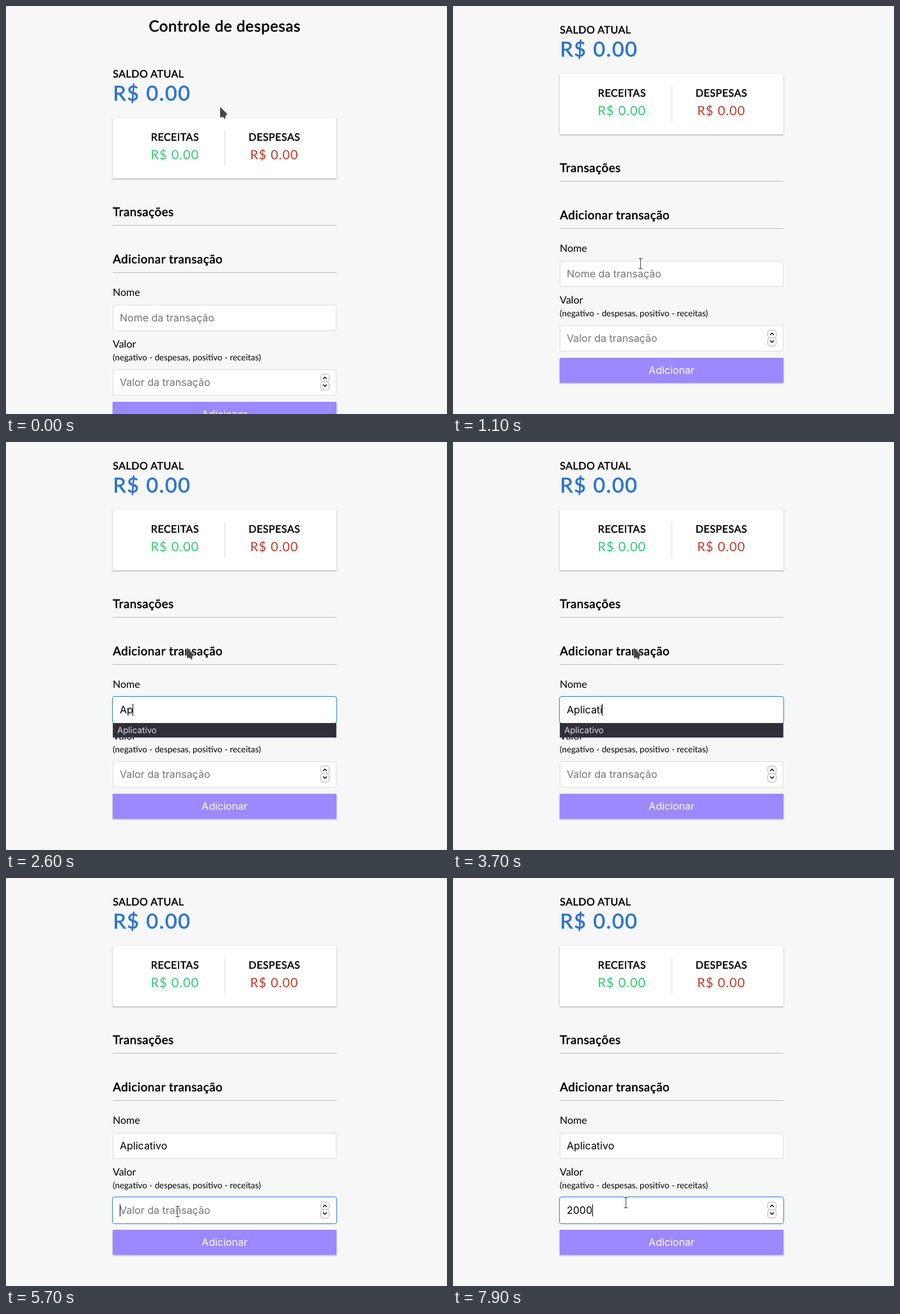
An HTML page that plays this animation: 690x639 px, repeating every 8000 ms.

```html
<!DOCTYPE html>
<html lang="pt-BR">
<head>
<meta charset="utf-8">
<title>Controle de despesas</title>
<style>
  html, body { margin: 0; width: 100%; height: 100%; overflow: hidden; background: #f7f7f7; }
  #stage { position: relative; width: 690px; height: 639px; overflow: hidden; }
  #page, .box, svg { position: absolute; left: 0; top: 0; }
  svg { width: 690px; height: 639px; overflow: visible; }
  .box { left: 167px; width: 350px; box-shadow: 0 1px 3px rgba(0,0,0,.12), 0 1px 2px rgba(0,0,0,.24); }
  .card { top: 106px; height: 95px; background: #fff; }
  .btn { top: 551px; height: 39px; background: #9c88ff; }
  text { font: 16px Lato, sans-serif; fill: #000; white-space: pre; text-rendering: geometricPrecision; }
  .mid { text-anchor: middle; }
  /* thin outline plus tracking thickens the regular weight */
  .h1, .h2, .h3, .h4 { stroke: #000; stroke-width: .5px; letter-spacing: .5px; }
  .h1 { font-size: 32px; fill: #2d74cb; stroke: #2d74cb; stroke-width: .75px; letter-spacing: 1.75px; }
  .h2 { font-size: 24px; stroke-width: .625px; letter-spacing: .625px; }
  .h3 { font-size: 18.72px; stroke-width: .54px; letter-spacing: .54px; }
  .money { font-size: 20px; letter-spacing: 1px; }
  .small { font-size: 13.333px; }
  .ui { font-family: Inter, sans-serif; }
  .hint { fill: #757575; }
  .item { font-size: 13.333px; fill: #dcdce2; }
  .field { fill: #fff; stroke: #dedede; }
  .field.on { stroke: #2f7fd3; }
  .spin { fill: #fff; stroke: #b5b5ba; }
  .chev { fill: none; stroke: #111; stroke-width: 1.5; }
</style>
</head>
<body>
<div id="stage">
  <div id="page">
    <div class="box card"></div>
    <div class="box btn"></div>
    <svg>
      <text class="h2 mid" x="342.3" y="-29">Controle de despesas</text>
      <text class="h4" x="167.2" y="43">SALDO ATUAL</text>
      <text class="h1" x="167.4" y="79">R$ 0.00</text>
      <text class="h4 mid" x="264.5" y="142">RECEITAS</text>
      <text class="h4 mid" x="420" y="142">DESPESAS</text>
      <text class="money mid" x="264.3" y="171" style="fill:#2ecc71">R$ 0.00</text>
      <text class="money mid" x="419.8" y="171" style="fill:#c0392b">R$ 0.00</text>
      <path d="M342.5 126V181" stroke="#dedede"/>
      <text class="h3" x="167.2" y="260">Transações</text>
      <text class="h3" x="167.2" y="334">Adicionar transação</text>
      <path d="M167 274.5H517M167 348.5H517" stroke="#bbb"/>
      <text x="167" y="385">Nome</text>
      <text x="167" y="466">Valor</text>
      <text class="small" x="167" y="486">(negativo - despesas, positivo - receitas)</text>
      <rect class="field" id="box0"/>
      <rect class="field" id="box1"/>
      <text class="ui" id="text0" x="178" y="425"></text>
      <text class="ui" id="text1" x="178" y="526"></text>
      <rect class="spin" x="492.5" y="507.5" width="13" height="12" rx="3.5"/>
      <rect class="spin" x="492.5" y="519.5" width="13" height="13" rx="3.5"/>
      <path class="chev" d="M496 515.2l3-3 3 3M496 523.8l3 3 3-3"/>
      <rect id="caret" width="1" height="19"/>
      <text class="ui mid" x="342" y="576" style="fill:#fff">Adicionar</text>
      <g id="list">
        <rect id="panel" x="167.5" y="440.5" width="349" fill="#2f2f37" stroke="#4c4c55"/>
        <g id="items"></g>
      </g>
    </svg>
  </div>
  <svg>
    <g id="arrow">
      <path d="M0 1.5V17.5L4 17 8 20.5 8.8 14.5 12 13Z" fill="#000" opacity=".15"/>
      <path d="M0 0V16.2L4 15.4 8 19 8.7 13.2 11.6 11.6Z" fill="#474747" stroke="#fff" stroke-width="1" paint-order="stroke"/>
    </g>
    <g id="beam" fill="none">
      <path d="M-2.5 -8H3.5M-2.5 8H3.5M.5 -8V8" stroke="#fff" stroke-width="3" opacity=".8"/>
      <path d="M-2.5 -8H3.5M-2.5 8H3.5M.5 -8V8" stroke="#444"/>
    </g>
  </svg>
</div>
<script>
const LOOP = 8000;
const $ = id => document.getElementById(id);

// each track is a list of [start ms, value...]
const scroll = [[0, 69], [100, 54], [200, 30], [300, 13], [400, 6], [500, 3], [600, 2], [700, 1], [800, .5], [900, 0]];
const pointer = [
  [0, 'arrow', 335, 158], [300, 'arrow', 334, 159], [500, 'arrow', 330, 185],
  [600, 'arrow', 321, 250], [700, 'arrow', 308, 330], [800, 'beam', 297, 395],
  [900, 'beam', 293, 424], [1000, 'beam', 293, 411], [1100, 'beam', 293, 403],
  [1200, 'beam', 293, 405], [1400, 'arrow', 286, 375], [1500, 'arrow', 283, 335],
  [1600, 'arrow', 282, 314], [2300, 'arrow', 283, 322], [5100, 'arrow', 281, 350],
  [5200, 'beam', 274, 425], [5300, 'arrow', 271, 485], [5400, 'beam', 270, 534],
  [5700, 'beam', 268, 522], [7900, 'beam', 270, 508]
];
const focus = [[0, -1], [1200, 0], [5700, 1]];
const caretOn = [[0, 1], [4900, 0], [5700, 1]];
const rows = [[0, 0], [2400, 4], [2600, 1], [5700, 0]];

// a typing track adds one letter at each time
const typed = (word, times) => [[0, ''], ...times.map((ms, i) => [ms, word.slice(0, i + 1)])];
const fields = [
  { y: 399, hint: 'Nome da transação',
    value: typed('Aplicativo', [2300, 2600, 2800, 3000, 3100, 3200, 3400, 3700, 4000, 4200]) },
  { y: 500, hint: 'Valor da transação',
    value: typed('2000', [6600, 6800, 7000, 7300]) }
];
const options = ['Aplicativo', 'Academia', 'Aluguel', 'Almoço'];

const at = (track, t) => track.findLast(step => step[0] <= t).slice(1);

function set(el, attrs) {
  for (const key in attrs) el.setAttribute(key, attrs[key]);
}

const items = options.map((name, i) => {
  const el = document.createElementNS('http://www.w3.org/2000/svg', 'text');
  set(el, { class: 'ui item', x: 174, y: 456 + i * 21 });
  el.textContent = name;
  return $('items').appendChild(el);
});

function drawField(f, i, t, active) {
  const [value] = at(f.value, t);
  const grow = active ? 1 : 0;
  const text = $('text' + i);
  set($('box' + i), {
    class: active ? 'field on' : 'field',
    x: 167.5 - grow, y: f.y + .5 - grow,
    width: 349 + 2 * grow, height: 40 + 2 * grow, rx: 1.5 + 2 * grow
  });
  const shown = value || f.hint;
  if (text.textContent !== shown) text.textContent = shown;
  text.classList.toggle('hint', !value);
  if (active) {
    const width = value ? text.getComputedTextLength() : 0;
    set($('caret'), { x: Math.floor(178 + width), y: f.y + 11 });
  }
}

function draw(t) {
  const [active] = at(focus, t);
  const [count] = at(rows, t);
  const [shape, x, y] = at(pointer, t);

  $('page').style.transform = `translateY(${Math.round(at(scroll, t)[0])}px)`;
  fields.forEach((f, i) => drawField(f, i, t, i === active));
  $('caret').style.display = active >= 0 && at(caretOn, t)[0] ? '' : 'none';

  $('list').style.display = count ? '' : 'none';
  set($('panel'), { height: count * 21 + 1 });
  items.forEach((el, i) => { el.style.display = i < count ? '' : 'none'; });

  for (const id of ['arrow', 'beam']) {
    $(id).style.display = id === shape ? '' : 'none';
    set($(id), { transform: `translate(${x} ${id === 'beam' ? y + .5 : y})` });
  }
}

const start = performance.now();
function tick() {
  draw((performance.now() - start) % LOOP);
  requestAnimationFrame(tick);
}
tick();
</script>
</body>
</html>
```
